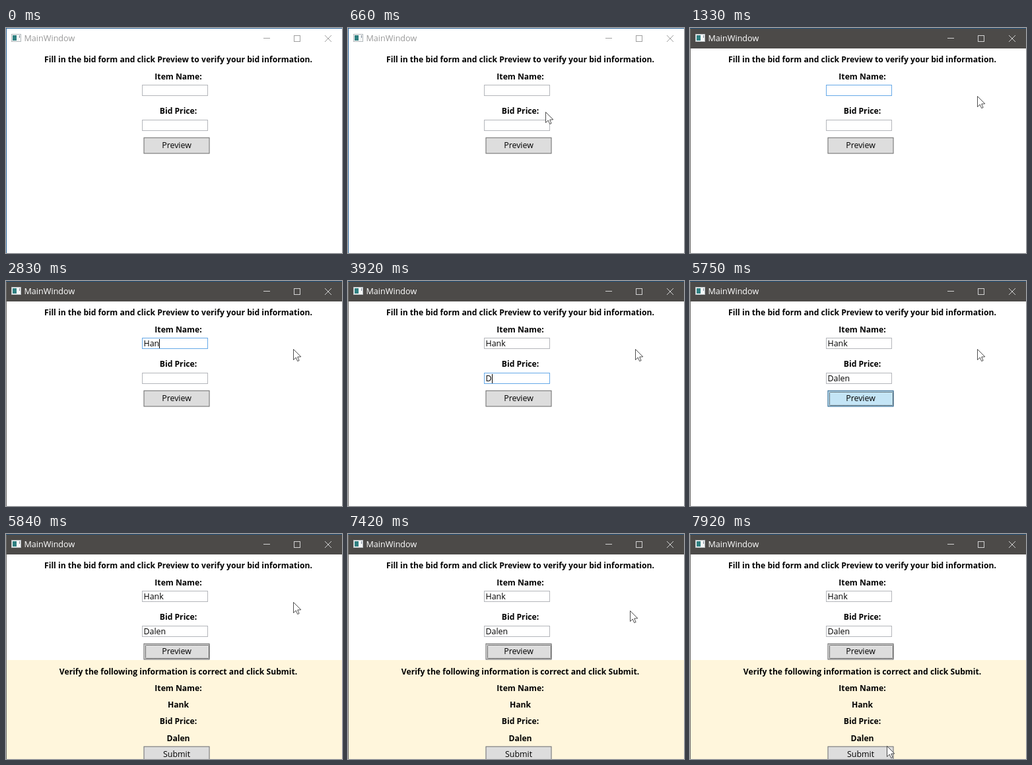
An HTML page with a canvas for the animation above (8 s loop, 509 by 341 pixels).

```html
<!DOCTYPE html>
<html lang="en">
<head>
<meta charset="utf-8">
<title>Bid form</title>
<style>
  html, body { margin: 0; width: 100%; height: 100%; overflow: hidden; background: #fff; }
  canvas { display: block; }
</style>
</head>
<body>
<canvas id="stage" width="509" height="341"></canvas>
<script>
const ctx = document.getElementById('stage').getContext('2d');
const LOOP = 8000, STEP = 1000 / 12, BLINK = 500;
const BOLD = 'bold 12.15px "Open Sans", "Noto Sans", sans-serif';
const PLAIN = '12.4px "Open Sans", "Noto Sans", sans-serif';
const TITLE = '12.6px "Open Sans", "Noto Sans", sans-serif';
const CENTER = 261;

// Key times in ms
const CLICK = 750, TAB_PRICE = 3420, TAB_BUTTON = 5170, PRESS = 5750, SHOW = 5840;
const ITEM = { text: 'Hank', keys: [2080, 2250, 2830, 3080], from: CLICK, to: TAB_PRICE };
const PRICE = { text: 'Dalen', keys: [3920, 4090, 4340, 4500, 4670], from: TAB_PRICE, to: TAB_BUTTON };

// Mouse moves: start and end time, start and end point
const MOVES = [
  { from: 0, to: 750, a: [500, 352], b: [270, 95] },
  { from: 830, to: 1170, a: [270, 95], b: [435, 103] },
  { from: 7330, to: 7920, a: [435, 103], b: [298, 321.5] }
];

function fill(color, x, y, w, h) {
  ctx.fillStyle = color;
  ctx.fillRect(x, y, w, h);
}

function frame(color, x, y, w, h) {
  ctx.strokeStyle = color;
  ctx.lineWidth = 1;
  ctx.strokeRect(x + .5, y + .5, w - 1, h - 1);
}

function label(text, x, y, font = BOLD, color = '#000', align = 'center') {
  ctx.font = font;
  ctx.fillStyle = color;
  ctx.textAlign = align;
  ctx.fillText(text, x, y);
}

function line(points) {
  ctx.beginPath();
  points.forEach(([x, y]) => ctx.lineTo(x, y));
  ctx.stroke();
}

function titleBar(active) {
  const ink = active ? '#d2d2d2' : '#a0a0a0';
  fill(active ? '#4c4a48' : '#fff', 0, 1, 509, 30);
  fill(active ? '#1f4e79' : '#2a649a', 0, 0, 509, 1);
  fill(active ? '#6e6d6b' : '#2a649a', 0, 1, 1, 340);

  fill('#f6f7f7', 8, 9, 15, 12);
  frame('#b4babd', 8, 9, 15, 12);
  fill('#2f7f80', 10, 11, 6, 8);
  fill('#7d8a99', 20, 11, 1, 4);

  label('MainWindow', 27.5, 20, TITLE, active ? '#fff' : '#999', 'left');
  fill(ink, 390, 15, 10, 1);
  frame(ink, 436, 11, 10, 10);
  line([[483, 11], [493, 21]]);
  line([[493, 11], [483, 21]]);
}

function textBox(field, y, t) {
  const focused = t >= field.from && t < field.to;
  const pressed = field.keys.filter(k => k <= t);
  const typed = field.text.slice(0, pressed.length);
  fill('#fff', 206, y, 100, 17);
  frame(focused ? '#66a9e8' : '#b4b6bb', 206, y, 100, 17);
  label(typed, 208.5, y + 13, PLAIN, '#000', 'left');
  if (!focused) return;
  const since = t - (pressed.length ? pressed[pressed.length - 1] : field.from + 80);
  if (Math.floor(Math.max(0, since) / BLINK) % 2 === 0)
    fill('#000', Math.round(208.5 + ctx.measureText(typed).width), y + 2, 1, 14);
}

// Buttons sit between pixels, so their edges are soft
function button(text, y, focused, pressed) {
  fill(pressed ? '#c4e5f6' : '#ddd', 208.5, y, 100, 24.7);
  frame(pressed ? '#2c628b' : '#707070', 208.5, y, 100, 24.7);
  if (focused) {
    ctx.setLineDash([1, 1]);
    ctx.lineDashOffset = .5;
    frame('#000', 211, Math.round(y) + 2, 97, 21);
    ctx.setLineDash([]);
  }
  label(text, 258.5, Math.round(y) + 16, PLAIN);
}

function previewPanel() {
  fill('#fff6dc', 1, 191, 508, 150);
  label('Verify the following information is correct and click Submit.', CENTER, 213);
  label('Item Name:', CENTER, 238);
  label(ITEM.text, CENTER, 263);
  label('Bid Price:', CENTER, 288);
  label(PRICE.text, CENTER, 314);
  button('Submit', 321.7, false, false);
}

// The pointer is sampled twelve times a second
function pointerAt(t) {
  const sampled = Math.floor((t + 4) / STEP) * STEP;
  const move = MOVES.filter(m => t >= m.from).pop();
  const p = Math.min(1, Math.max(0, (sampled - move.from) / (move.to - move.from)));
  const eased = p * p * (3 - 2 * p);
  return move.a.map((v, i) => v + (move.b[i] - v) * eased);
}

function pointer([x, y]) {
  ctx.save();
  ctx.translate(Math.round(x) + .5, Math.round(y) + .5);
  ctx.lineWidth = .8;
  ctx.strokeStyle = '#222';
  if (x > 206 && x < 306 && y > 86 && y < 103) {
    line([[-3, -8], [3, -8]]);
    line([[0, -8], [0, 8]]);
    line([[-3, 8], [3, 8]]);
  } else {
    ctx.beginPath();
    [[0, 0], [0, 16], [3.7, 12.5], [6.2, 18], [8.6, 17], [6.2, 11.6], [11.3, 11.3]]
      .forEach(([px, py]) => ctx.lineTo(px, py));
    ctx.closePath();
    ctx.fillStyle = '#fff';
    ctx.fill();
    ctx.stroke();
  }
  ctx.restore();
}

function draw() {
  const t = performance.now() % LOOP;
  fill('#fff', 0, 0, 509, 341);
  titleBar(t >= CLICK);
  label('Fill in the bid form and click Preview to verify your bid information.', CENTER, 52);
  label('Item Name:', CENTER, 78);
  textBox(ITEM, 86, t);
  label('Bid Price:', CENTER, 130);
  textBox(PRICE, 139, t);
  if (t >= SHOW) previewPanel();
  button('Preview', 165.8, t >= TAB_BUTTON, t >= PRESS && t < SHOW);
  if (t >= 80) pointer(pointerAt(t));
  requestAnimationFrame(draw);
}
draw();
</script>
</body>
</html>
```
